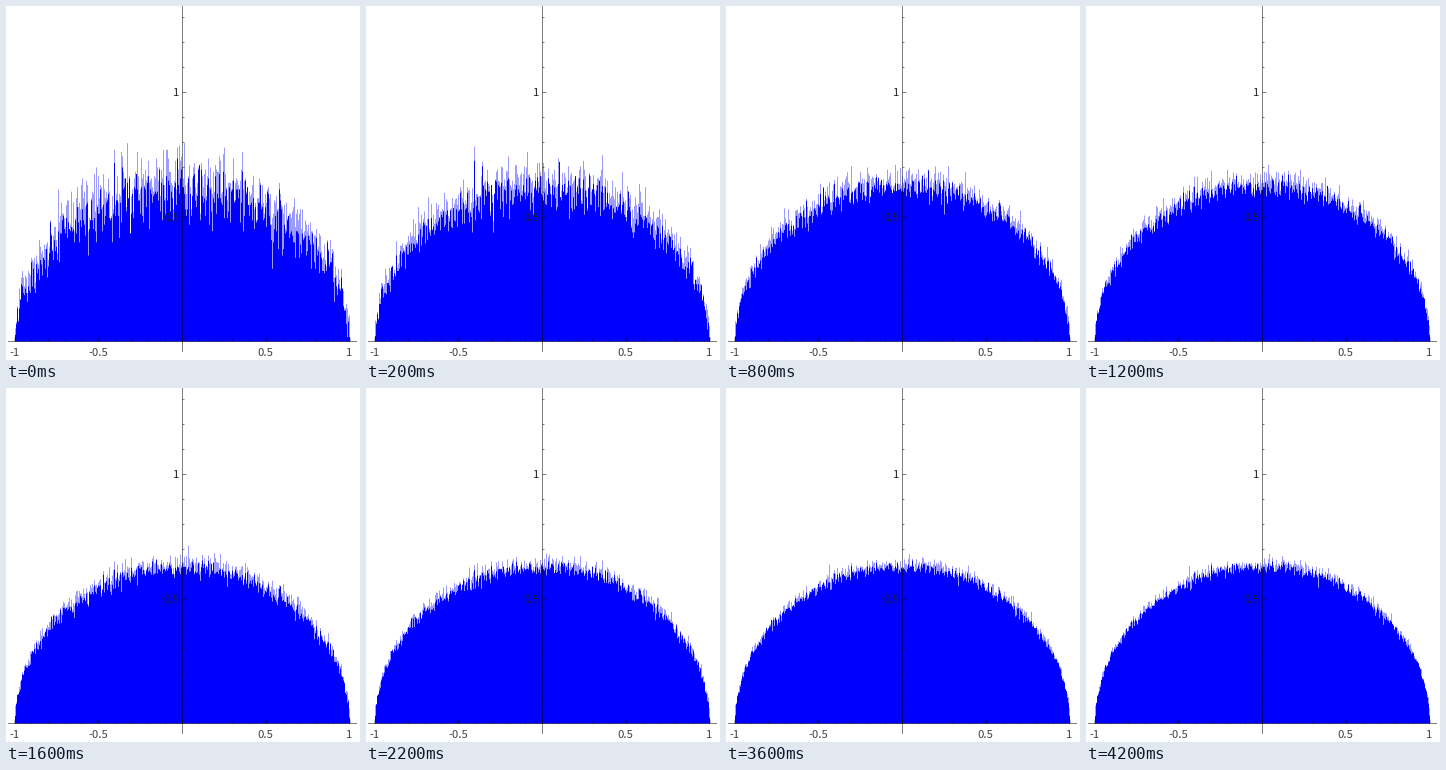
A matplotlib script that plays this animation: 354 px wide and 354 px high, repeating every 4.4 s.

```python
import numpy as np
import matplotlib.pyplot as plt
from matplotlib.animation import FuncAnimation

SIZE, DPI = 354, 100
FRAMES, INTERVAL = 22, 200
X0, Y0 = 176.5, 335.5        # pixel position of the plot's zero point
SX, SY = 167.5, 249          # pixels per unit
COLUMNS = 335                # pixel columns, two thin bars in each
PER_UNIT = 113               # samples per batch for a density of 1
POINT = 72 / DPI             # one pixel in points


def px(x):
    return X0 + SX * x


def py(y):
    return Y0 - SY * y


# Running average of random batches drawn from the semicircle law
edges = np.linspace(-1, 1, 2 * COLUMNS + 1)
mids = (edges[:-1] + edges[1:]) / 2
density = 2 / np.pi * np.sqrt(1 - mids**2)
rng = np.random.default_rng(12)
batches = rng.poisson(density * PER_UNIT, (FRAMES, mids.size)) / PER_UNIT
heights = np.cumsum(batches, axis=0) / np.arange(1, FRAMES + 1)[:, None]

# A column is solid where both bars reach and pale where only one does
pairs = heights.reshape(FRAMES, COLUMNS, 2)
solid, pale = py(pairs.min(axis=2)), py(pairs.max(axis=2))

fig = plt.figure(figsize=(SIZE / DPI, SIZE / DPI), dpi=DPI, facecolor="white")
ax = fig.add_axes([0, 0, 1, 1])
ax.set_xlim(0, SIZE)
ax.set_ylim(SIZE, 0)
ax.axis("off")


def bars(tops, color):
    return ax.stairs(tops, px(edges[::2]), baseline=Y0, fill=True, color=color,
                     linewidth=0, snap=False, zorder=1)


def line(xs, ys):
    ax.plot(xs, ys, color="black", linewidth=0.5 * POINT, snap=False,
            solid_capstyle="butt", zorder=2)


def label(x, y, text, ha, color):
    ax.text(x, y, text, ha=ha, va="baseline", color=color,
            family="Noto Sans CJK JP", fontsize=11.3 * POINT, zorder=3)


def tick_length(k):
    return 4 if k % 5 == 0 else 2


pale_bars = bars(pale[0], "#9c9cff")
solid_bars = bars(solid[0], "#0000ff")

line([2, 351], [Y0, Y0])
line([X0, X0], [0, 346])
for k in range(-10, 11):
    line([px(k / 10)] * 2, [Y0, Y0 - tick_length(k)])
for k in range(1, 14):
    line([X0, X0 + tick_length(k)], [py(k / 10)] * 2)

for value in (-1, -0.5, 0.5, 1):
    label(px(value) - 0.5, 350, f"{value:g}", "center", "#404040")
for value in (0.5, 1):
    label(173.5, py(value) + 4, f"{value:g}", "right", "#202020")


def update(frame):
    pale_bars.set_data(values=pale[frame])
    solid_bars.set_data(values=solid[frame])
    return [pale_bars, solid_bars]


anim = FuncAnimation(fig, update, frames=FRAMES, interval=INTERVAL,
                     repeat=True, repeat_delay=0)
plt.show()
```
